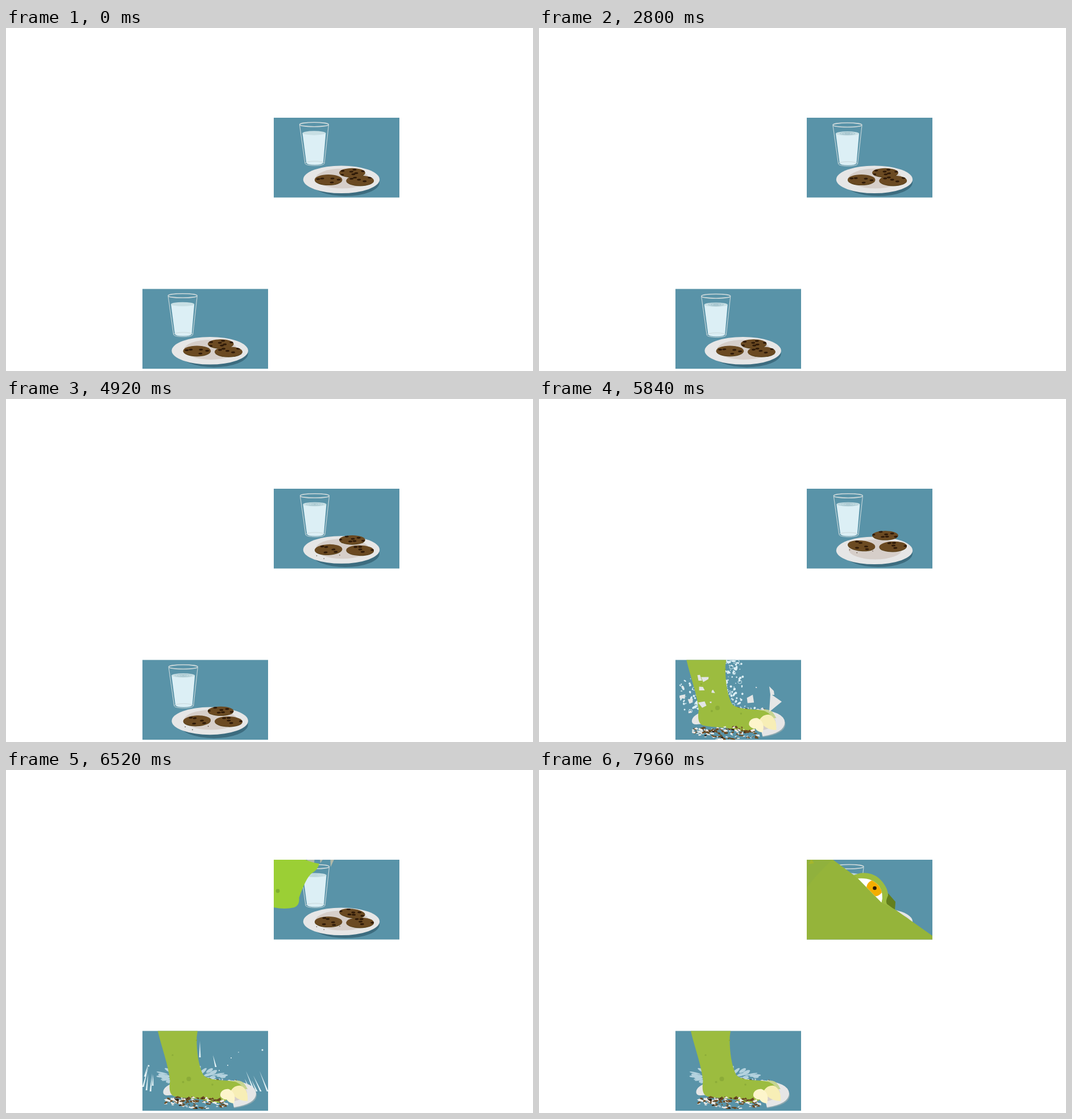
An HTML page with a canvas that plays this animation: 927 px wide and 604 px high, repeating every 8000 ms.

```html
<!DOCTYPE html>
<html lang="en">
<head>
<meta charset="utf-8">
<title>Milk and cookies</title>
<style>
html, body { margin: 0; width: 100%; height: 100%; overflow: hidden; background: #fff; }
canvas { display: block; width: 927px; height: 604px; }
</style>
</head>
<body>
<canvas id="stage"></canvas>
<script>
const W = 927, H = 604, LOOP = 8000, STEP = 40, STOMP = 5600;
const canvas = document.getElementById('stage');
const c = canvas.getContext('2d');
const dpr = window.devicePixelRatio || 1;
canvas.width = W * dpr;
canvas.height = H * dpr;

const SEA = '#5993a8', PLATE = '#e6e6e6', SKIN = '#9cbc3f', SPOT = '#8cac38';
const BROWN = '#6b4a22', CHIP = '#2f1a08', DROP = '#dceff5';

const clamp = v => Math.max(0, Math.min(1, v));
const easeOut = (v, n = 2) => 1 - Math.pow(1 - clamp(v), n);
const rnd = i => { const v = Math.sin(i * 127.1 + 3.7) * 43758.5453; return v - Math.floor(v); };
const between = (i, a, b) => a + (b - a) * rnd(i);

// Each footfall: start, shake, hop of front and back cookies, glass drift, cookie spin, tilt, shift of the back cookie
const falls = [
  { t: 1200, shake: .8, hop: [1, 2], x: .5, spin: 9, tilt: 0, pile: 0 },
  { t: 2800, shake: 1.3, hop: [1.6, 4], x: .1, spin: 33, tilt: 1, pile: .9 },
  { t: 4520, shake: 1, hop: [3.4, 8], x: .6, spin: 52, tilt: -4, pile: 1.6 },
  { t: 5600, shake: .9, hop: [9, 12.5], x: 1.3, spin: 58, tilt: 5, pile: 2.4 },
  { t: 7200, shake: 1.2, hop: [2, 4], x: 3.5, spin: 64, tilt: 2, pile: 2.4 }
];

function quake(t) {
  const q = { x: 0, y: 0, front: 0, back: 0, spin: 0, tilt: 0, pile: 0, lift: 0, ripple: 0, phase: 0 };
  for (const f of falls) {
    const s = t - f.t;
    if (s < 0) continue;
    const go = easeOut(s / 500);
    q.x += (f.x - q.x) * go;
    q.pile += (f.pile - q.pile) * go;
    q.spin += (f.spin - q.spin) * easeOut(s / 900);
    const fade = clamp(1 - s / 1360);
    q.ripple = fade * Math.min(1, f.shake);
    if (!fade) continue;
    const wave = Math.sin(s * 2 * Math.PI / 190) * fade * f.shake;
    const p = clamp(s / 500), arc = 4 * p * (1 - p);
    q.x += wave;
    q.y = .6 * fade * f.shake;
    q.front = f.hop[0] * arc;
    q.back = f.hop[1] * arc;
    q.tilt = f.tilt * arc;
    q.lift = f.t === 4520 ? 2 * arc : 0;
    q.phase = s / 300;
  }
  return q;
}

function fill(color) { c.fillStyle = color; c.fill(); }
function line(color, width = 1) { c.strokeStyle = color; c.lineWidth = width; c.stroke(); }
function oval(x, y, rx, ry, color, a = 0) {
  c.beginPath();
  c.ellipse(x, y, rx, ry, a, 0, 7);
  if (color) fill(color);
}
function shape(d, color) { c.fillStyle = color; c.fill(new Path2D(d)); }
function at(x, y, draw) { c.save(); c.translate(x, y); draw(); c.restore(); }

function glass(q) {
  at(q.x, q.y, () => {
    shape('M521.5 185L528.3 237Q529 241 543 241Q557 241 558 237L562.5 185Z', DROP);
    oval(542, 185, 20.5, 3.7, '#c8dfe4');
    if (q.ripple > 0) {
      c.save();
      c.globalAlpha = q.ripple;
      for (let i = 0; i < 4; i++) {
        const r = ((i + q.phase) % 4) / 4;
        oval(542, 185, 18 * r, 3 * r);
        line('#97b9c5', .7);
      }
      c.restore();
    }
    c.beginPath();
    c.moveTo(516.5, 171); c.lineTo(526, 238);
    c.moveTo(567.5, 171); c.lineTo(560, 238);
    line('#c9d8db', 1.1);
    oval(543, 238.5, 17, 3.9);
    line('#c9d8db', 1);
    oval(542, 170, 25.5, 3.7);
    line('#cfdadb', 1.5);
  });
}

function cookie(x, y, rx, ry, chips, spin, tilt) {
  const a = spin * Math.PI / 180, cos = Math.cos(a), sin = Math.sin(a);
  at(x, y, () => {
    c.rotate(tilt * Math.PI / 180);
    oval(0, .9, rx, ry, '#574019');
    oval(0, 0, rx, ry - .3, BROWN);
    c.beginPath();
    c.ellipse(0, 0, rx, ry, 0, 0, 7);
    c.clip();
    for (const [dx, dy] of chips) {
      const u = dx / rx, v = dy / ry;
      oval((u * cos - v * sin) * rx, (u * sin + v * cos) * ry, 3.5, 1.6, CHIP, -.05);
    }
  });
}

const leftChips = [[-18, -1], [-11, -2], [7, -2], [18, 0], [6, 5]];
const rightChips = [[-9, -5], [-15, -3], [-2, -1.3], [8, 1.3], [17, -5.2]];
const backChips = [[4, -5], [-1.5, -1.5], [7, 1.2], [2, 3.2], [-17, -2.8], [19, -2.3], [-18, 4]];

function crumbs(t, q) {
  const dot = (x, y) => oval(x, y, .8, .8, '#574536');
  if (t >= 3000 && t < 4620) dot(594.5, 273);
  if (t >= 4620) {
    const hop = t > STOMP ? q.front * 1.15 : 0;
    dot(546.5, 276 - hop);
    dot(559.3, 281 - hop);
    dot(587, 275 - hop * .7);
  }
}

function table(t, q) {
  glass(q);
  oval(597, 272, 60, 24, '#3c6c7f');
  at(0, -q.lift, () => {
    oval(590, 266.8, 67.2, 24.3, PLATE);
    oval(591.5, 265, 47, 17.5, '#d6cec9');
  });
  crumbs(t, q);
  const spin = q.spin * .73;
  cookie(609, 254.5 - q.pile - q.back, 22.7, 8, backChips, spin, 2.6 * q.pile * (1 - clamp(q.back / 5)));
  cookie(567.2, 267 - q.front, 24.2, 9.2, leftChips, q.spin, q.tilt);
  cookie(622.8, 268.5 - q.front, 24.3, 9, rightChips, spin, -q.tilt * .4);
}

function shard(x, y, size, seed, color, turn = 0, flat = .85) {
  at(x, y, () => {
    c.rotate(turn);
    c.beginPath();
    for (let i = 0; i < 4; i++) {
      const a = i * 1.57 + rnd(seed + i * 9) * 1.1, r = size * between(seed + i * 5, .6, 1.15);
      c.lineTo(Math.cos(a) * r, Math.sin(a) * r * flat);
    }
    fill(color);
  });
}

function puddle(s) {
  const grow = easeOut((s - 250) / 450);
  if (!grow) return;
  c.save();
  c.globalAlpha = grow;
  for (let i = 0; i < 40; i++) {
    const a = i * 2.4, r = between(i, .5, .92);
    const x = 327 + Math.cos(a) * 66 * r * grow, y = 541 + Math.sin(a) * 16 * r * grow;
    oval(x, y, between(i + 50, 5, 12), between(i + 90, 1.3, 2.8), '#b4d2de', Math.atan2(Math.sin(a) * .4, Math.cos(a)));
  }
  c.restore();
}

function brokenPlate() {
  shape('M290 553Q276 559 276.5 568Q277 573 284 573L298 572Z', PLATE);
  shape('M395 547Q441 553 441 573Q440 590 401 595.5L398 580Z', '#8ca8b0');
  shape('M390 546Q440 550 440 570Q439 588 401 594L396 575Z', PLATE);
  shape('M392 550Q425 555 424 570Q423 578 402 583Z', '#d6cec9');
}

function debris(s, front) {
  const loose = 1 - easeOut(s / 600);
  const count = front ? 125 : 42;
  for (let i = 0; i < count; i++) {
    const k = i + (front ? 300 : 700);
    let x, y;
    if (front) {
      const a = rnd(k) * 6.28, r = Math.sqrt(rnd(k + 31));
      x = 335 + Math.cos(a) * 59 * r;
      y = 586 + (x - 335) * .04 + Math.sin(a) * 10 * r + loose * between(k + 6, -3, 16);
      x += loose * between(k + 12, -20, 20);
    } else {
      x = between(k, 342, 410);
      y = 544 + (x - 342) * .06 + between(k + 9, -2, 4);
    }
    const pick = rnd(k + 17);
    const color = pick < (x < 305 ? .8 : .5) ? '#eceae7' : pick < .93 ? BROWN : CHIP;
    shard(x, y, between(k + 3, 1.6, front ? 5.6 : 3), k, color, between(k + 23, -.6, .6), .48);
  }
}

function stompFoot() {
  shape('M400 547Q416 545 421 555L425 562L404 562Z', '#c5d491');
  shape('M255 420L267 459.5C274 490 286 520 288.5 548C286 565 289 573 297 575' +
    'C315 579 330 577 347 581Q362 587 380 586L396 576L415 557Q407 547 390 547' +
    'C365 546 352 543 347 537C338 520 335 492 335.5 470L337 459L337 420Z', SKIN);
  [[321.5, 544, 4], [311.5, 549.5, 2], [293, 502, 1.6], [363, 554, 1.8], [335, 476, 1.2]]
    .forEach(([x, y, r]) => oval(x, y, r, r, SPOT));
  shape('M394 570C396 560 404 555 413 556C423 560 426 571 425 583Q411 583 401 574Z', '#f7eeb6');
  shape('M377 574C376 565 385 561 392 562C400 565 404 574 402 582L401 587Q392 587 388 580Q381 581 377 574Z', '#fdf5cb');
}

// Ballistic path that passes the given point 240 ms after the stomp
function flight(s, x, y) {
  const u = s / 240;
  return [322 + (x - 322) * (.3 + .7 * u), 562 + (y - 562) * (2.6 * u - u * u) / 1.6];
}

const chunks = [[283, 490, 7], [293, 493, 8], [287, 510, 6], [306, 516, 5], [288, 538, 9], [252, 523, 7],
  [266, 531, 6], [372, 527, 10], [253, 508, 4], [266, 551, 4], [382, 508, 2], [302, 534, 2], [393, 545, 4]];

function spray(s) {
  if (s > 640) return;
  for (let i = 0; i < 170; i++) {
    const right = i % 5 < 3, r = rnd(i + 210);
    const ty = right ? between(i, 460, 548) : between(i, 482, 552);
    const tx = right ? 329 + r * r * 32 + Math.max(0, ty - 530) * r * 2 : 283 - r * r * 36;
    const [x, y] = flight(s, tx, ty);
    const size = between(i + 44, .6, 2.2);
    if (i % 13 === 0) {
      oval(x, y, size + 2, size + 1.6);
      line(DROP, .9);
    } else oval(x, y, size * (i % 3 ? 1 : 2), size, DROP, rnd(i) * 3);
  }
}

function flyingPlate(s) {
  if (s > 640) return;
  chunks.forEach(([tx, ty, size], i) => {
    const [x, y] = flight(s, tx, ty);
    shard(x, y, size, i + 20, '#e3e5e5', (s - 240) / 130);
  });
  const [x, y] = flight(s, 415, 530);
  at(x, y, () => {
    c.rotate((s - 240) / 400);
    shape('M-8 -11L12 3L-10 21Z', PLATE);
    shape('M-10 -24L-2 -16L-1 -9L-8 -9Z', PLATE);
  });
}

// Falling streaks: tip x, tip y, tail dx, tail dy
const streaks = [[341, 506, 0, -29], [369, 523, -5, -21], [241, 558, 10, -38], [247, 564, 3, -30], [254, 566, 3, -32],
  [258, 556, 1, -20], [244, 540, 6, -22], [435, 562, -13, -32], [448, 566, -13, -28], [441, 566, -9, -20],
  [460, 566, -14, -36], [427, 560, -7, -16]];
const beads = [[251, 521, 1.4], [409, 497, .8], [396, 507, 1], [390, 520, 1], [451, 493, 1.5], [375, 529, 1]];

function rain(t) {
  if (t < 6160 || t > 6960) return;
  const k = (t - 6520) * .22;
  for (const [x, y, dx, dy] of streaks) {
    if (y + k > 577) continue;
    const bx = x - k * dx / 35, by = y + k;
    c.beginPath();
    c.moveTo(bx + dx, by + dy);
    c.lineTo(bx + 1.5, by);
    c.lineTo(bx - 1.3, by);
    fill('#e6f4f7');
  }
  for (const [x, y, r] of beads) if (y + k < 570) oval(x, y + k, r, r, '#e6f4f7');
}

function crash(t) {
  const s = t - STOMP;
  const slide = -15.5 * (1 - easeOut(s / 800));
  if (s >= 0) {
    puddle(s);
    rain(t);
    spray(s);
  }
  at(slide, s < 0 ? s * 1.8 : 0, () => {
    if (s >= 0) { brokenPlate(); debris(s, false); }
    stompFoot();
    if (s >= 0) debris(s, true);
  });
  if (s >= 0) flyingPlate(s);
}

function passingFoot(t) {
  if (t < 6240 || t > 7000) return;
  const k = (t - 6520) / 280;
  at(90 * k, -34 * Math.max(0, k) ** 2, () => {
    shape('M527 140L544 140L542 165L531 166ZM550 140L558 140L557 158L553 164ZM570 140L580 150L576 160L571 171Z', '#b0b8a8');
    shape('M200 60L500 60L527 158Q538 163 551 165Q548 176 539 181C530 187 523 204 515.5 225' +
      'Q517 238 507 242Q490 246 471 242L200 235Z', '#9bcf35');
    oval(478, 213, 3.4, 3.4, '#7fae2f');
  });
}

function head(t) {
  if (t < 7040) return;
  const away = 1 - easeOut((t - 7000) / 960, 2.4);
  at(-225 * away, 0, () => {
    oval(588, 269, 66, 21.5, `rgba(120, 140, 142, ${.4 * (1 - away)})`);
    shape('M614 217L627 232L626 247L608 240Z', '#637f1c');
    shape('M550 187C566 178 584 180 596 189C608 199 614 211 614 221Q609 231 612 236L627 247L600 260Z', SKIN);
    shape('M200 130L480 130L517 158L555 186L602 233L627 246L692 292L730 319L730 340L200 340Z', '#95b43a');
    shape('M430 158L497 158L516 158Q490 182 471 207L430 240Z', '#90b13d');
    shape('M474 166L479 157L484 164Z', '#a5b62d');
    const eye = new Path2D('M561 191Q585 189 598 204Q607 218 602.5 233.5Z');
    c.fillStyle = '#fff';
    c.fill(eye);
    c.save();
    c.clip(eye);
    oval(590.5, 208, 14.5, 14.5, '#f4ae00');
    c.restore();
    oval(590.5, 208, 3.3, 3.3, '#2a1a08');
  });
}

function panel(x, y, draw) {
  c.save();
  c.beginPath();
  c.rect(x, y, 221, 140.5);
  fill(SEA);
  c.clip();
  draw();
  c.restore();
}

function render(t) {
  c.setTransform(dpr, 0, 0, dpr, 0, 0);
  c.fillStyle = '#fff';
  c.fillRect(0, 0, W, H);
  const q = quake(t);
  panel(471, 158, () => {
    table(t, q);
    passingFoot(t);
    head(t);
  });
  panel(240, 459.5, () => {
    if (t < STOMP) at(-231.3, 301.4, () => table(t, q));
    if (t > STOMP - 120) crash(t);
  });
}

const start = performance.now();
function tick() {
  const t = (performance.now() - start) % LOOP;
  render(Math.floor(t / STEP) * STEP);
  requestAnimationFrame(tick);
}
tick();
</script>
</body>
</html>
```
